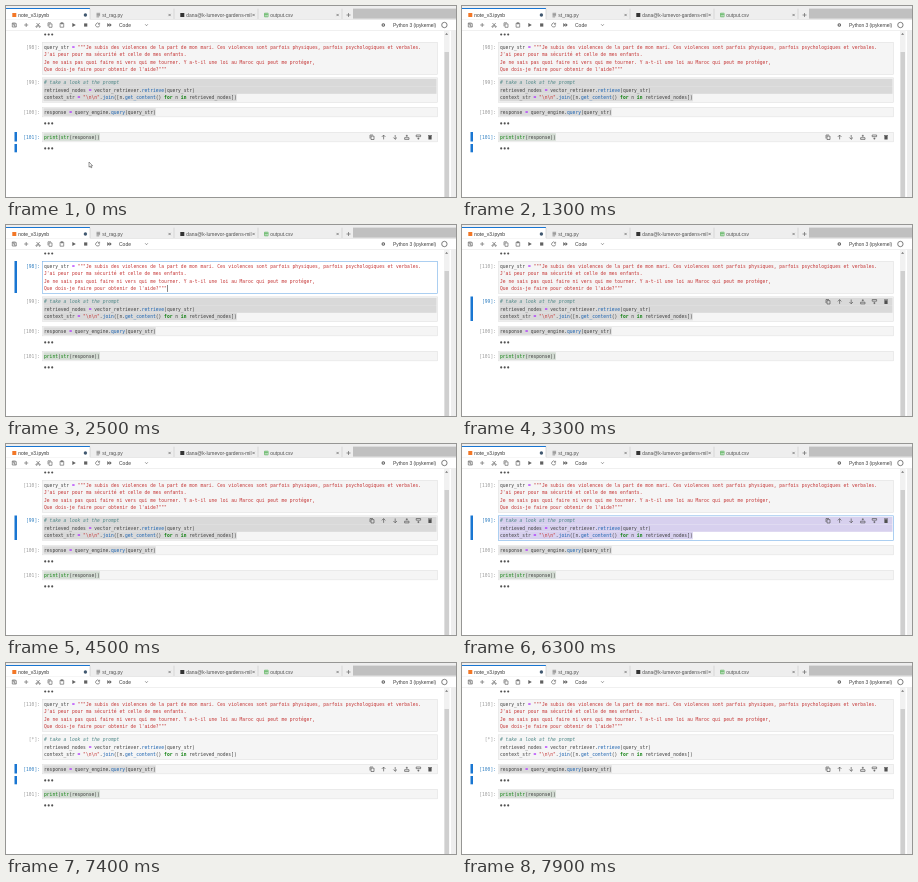
These frames come from a looping animation (450x191 px, 8000 ms). An HTML page with a canvas:

```html
<!DOCTYPE html>
<html lang="fr">
<head>
<meta charset="utf-8">
<title>Notebook</title>
<style>
  html, body { margin: 0; width: 100%; height: 100%; overflow: hidden; background: #fff; }
  canvas { display: block; width: 450px; height: 191px; }
</style>
</head>
<body>
<canvas id="stage"></canvas>
<script>
const W = 450, H = 191, LOOP = 8000;
const canvas = document.getElementById('stage');
const ctx = canvas.getContext('2d');
const dpr = window.devicePixelRatio || 1;
canvas.width = W * dpr;
canvas.height = H * dpr;

const MONO = '"DejaVu Sans Mono", monospace';
const SANS = '"Liberation Sans", Arial, sans-serif';
const CODE_SIZE = 4.64, CHAR = CODE_SIZE * 0.602, LINE = 7.5;
const LEFT = 36.5, RIGHT = 431.5, CODE_X = 38;
const TAB_W = 84, TAB_TOP = 2.6;
const BLUE = '#1976d2', EDIT_BLUE = '#76b0e8', ICON = '#616161';

// Token styles: colour and font prefix
const STYLES = {
  n: ['#404040', ''],
  o: ['#aa22ff', 'bold '],
  s: ['#c43434', ''],
  c: ['#508888', 'italic '],
  k: ['#108010', 'bold '],
  b: ['#108010', ''],
  p: ['#1a62b0', '']
};

const cells = [
  { y: 36.3, lines: [
    [['n', 'query_str '], ['o', '= '], ['s', '"""Je subis des violences de la part de mon mari. Ces violences sont parfois physiques, parfois psychologiques et verbales.']],
    [['s', "J'ai peur pour ma sécurité et celle de mes enfants."]],
    [['s', 'Je ne sais pas quoi faire ni vers qui me tourner. Y a-t-il une loi au Maroc qui peut me protéger,']],
    [['s', 'Que dois-je faire pour obtenir de l\'aide?"""']]
  ] },
  { y: 71.8, lines: [
    [['c', '# take a look at the prompt']],
    [['n', 'retrieved_nodes '], ['o', '= '], ['n', 'vector_retriever.'], ['p', 'retrieve'], ['n', '(query_str)']],
    [['n', 'context_str '], ['o', '= '], ['s', '"\\n\\n"'], ['n', '.'], ['p', 'join'], ['n', '([n.'], ['p', 'get_content'], ['n', '() '], ['k', 'for '], ['n', 'n '], ['k', 'in '], ['n', 'retrieved_nodes])']]
  ] },
  { y: 101.3, output: 113, lines: [
    [['n', 'response '], ['o', '= '], ['n', 'query_engine.'], ['p', 'query'], ['n', '(query_str)']]
  ] },
  { y: 126.3, output: 138, lines: [
    [['b', 'print'], ['n', '('], ['b', 'str'], ['n', '(response))']]
  ] }
];

function rect(x, y, w, h, color) {
  ctx.fillStyle = color;
  ctx.fillRect(x, y, w, h);
}

// Text is laid out large and scaled down so advances stay fractional.
function text(str, x, y, size, color, family = SANS, style = '', align = 'left') {
  ctx.save();
  ctx.translate(x, y);
  ctx.scale(0.1, 0.1);
  ctx.font = `${style}${size * 10}px ${family}`;
  ctx.textAlign = align;
  ctx.fillStyle = color;
  ctx.fillText(str, 0, 0);
  ctx.restore();
}

function icon(path, x, y, color = ICON, fill = false, width = 0.65) {
  const p = new Path2D(path);
  ctx.save();
  ctx.translate(x, y);
  ctx.lineWidth = width;
  ctx.strokeStyle = ctx.fillStyle = color;
  fill ? ctx.fill(p) : ctx.stroke(p);
  ctx.restore();
}

const SHAPES = {
  save: 'M-2-2H1.2L2-1.2V2H-2ZM-1.2-2V-.7H.8V-2M-.7.6H.7V2',
  plus: 'M-2 0H2M0-2V2',
  cut: 'M-1.6-2L1 1.2M1.6-2L-1 1.2M-.8 1.6A.7.7 0 1 1-2.2 1.6A.7.7 0 1 1-.8 1.6M2.2 1.6A.7.7 0 1 1 .8 1.6A.7.7 0 1 1 2.2 1.6',
  copy: 'M-1-1.1H2V2.3H-1ZM-2 1.3V-2.2H1',
  paste: 'M-1.8-1.7H1.8V2.2H-1.8ZM-.8-2.3H.8V-1.1H-.8Z',
  run: 'M-1.5-2.1L2 0L-1.5 2.1Z',
  stop: 'M-1.6-1.6H1.6V1.6H-1.6Z',
  restart: 'M1.5-1.3A2 2 0 1 0 2 .4M2-2.2V-.7H.5',
  forward: 'M-2.2-1.9L0 0L-2.2 1.9ZM0-1.9L2.2 0L0 1.9Z',
  chevron: 'M-1.3-.7L0 .7L1.3-.7',
  close: 'M-1.1-1.1L1.1 1.1M1.1-1.1L-1.1 1.1',
  up: 'M0 2.2V-2M-1.8-.3L0-2.1L1.8-.3',
  down: 'M0-2.2V2M-1.8.3L0 2.1L1.8.3',
  above: 'M-2.2.5H2.2V2.2H-2.2ZM0-.4V-2.4M-1-1.4H1',
  below: 'M-2.2-2.2H2.2V-.5H-2.2ZM0 .4V2.4M-1 1.4H1',
  trash: 'M-1.6-1.1H1.6V2.4H-1.6ZM-2-2.3H2V-1.5H-2Z',
  lines: 'M-1.8-1.7H1.8M-1.8-.5H1.8M-1.8.7H1.8M-1.8 1.9H.8',
  grid: 'M-1.8-1.8H1.8V1.8H-1.8ZM-1.8-.4H1.8M-.3-1.8V1.8',
  block: 'M-2-2H2V2H-2Z',
  arrow: 'M-1.5.8L0-1L1.5.8Z',
  pointer: 'M0 0V5.2L1.2 4.1L2 5.9L2.8 5.5L2 3.8H3.6Z'
};

function circle(x, y, r, color, fill) {
  ctx.beginPath();
  ctx.arc(x, y, r, 0, Math.PI * 2);
  ctx.lineWidth = 0.8;
  ctx.fillStyle = ctx.strokeStyle = color;
  fill ? ctx.fill() : ctx.stroke();
}

function drawTabs() {
  rect(0, 0, W, 13, '#eeeeee');
  rect(4 * TAB_W + 11, TAB_TOP, W, 10, '#c0c0c0');
  rect(0, 13, W, 0.5, '#d0d0d0');
  const tabs = [
    ['note_v3.ipynb', 'block', '#f37726'],
    ['st_rag.py', 'lines', '#707070'],
    ['dana@k-lumevor-gardens-mil', 'block', '#333333'],
    ['output.csv', 'grid', '#4caf50']
  ];
  tabs.forEach(([label, shape, color], i) => {
    const active = i === 0, x = i * TAB_W, end = x + TAB_W;
    if (active) {
      rect(x, TAB_TOP, TAB_W, 11, '#ffffff');
      rect(x, TAB_TOP - 0.6, TAB_W, 1, BLUE);
    }
    rect(end - 0.3, TAB_TOP, 0.6, 10.4, '#c8c8c8');
    icon(SHAPES[shape], x + 8.3, 9, color, shape === 'block');
    text(label, x + 12.3, 10.9, 4.95, active ? '#333333' : '#505050');
    if (active) circle(end - 4.6, 9, 1.7, '#405870', true);
    else icon(SHAPES.close, end - 4.4, 9);
  });
  icon(SHAPES.plus, 4 * TAB_W + 6.5, 9);
}

function drawToolbar() {
  const names = ['save', 'plus', 'cut', 'copy', 'paste', 'run', 'stop', 'restart', 'forward'];
  const solid = ['run', 'stop', 'forward'];
  names.forEach((name, i) => icon(SHAPES[name], 8.3 + i * 11.9, 19, ICON, solid.includes(name)));
  text('Code', 113, 20.8, 5, '#404040');
  icon(SHAPES.chevron, 140.5, 19);
  circle(377.3, 19, 1.8, ICON, true);
  circle(377.3, 19, 0.7, '#ffffff', true);
  text('Python 3 (ipykernel)', 387, 20.8, 4.85, '#404040');
  circle(438.4, 19, 2.7, ICON);
  rect(0, 24, W, 0.5, '#e0e0e0');
}

function drawScrollbar() {
  rect(438, 24.5, 5.5, H, '#f1f1f1');
  icon(SHAPES.arrow, 440.6, 28, '#707070', true);
  rect(438.5, 46, 4.5, H, '#cfcfcf');
  rect(445, 24.5, 5, H, '#eeeeee');
}

function drawDots(y) {
  for (let i = 0; i < 3; i++) circle(39.2 + i * 3.5, y, 1.05, '#505050', true);
}

function lineLength(line) {
  return line.reduce((n, [, str]) => n + str.length, 0);
}

function drawSelection(cell, color) {
  cell.lines.forEach((line, i) => {
    const last = i === cell.lines.length - 1;
    const end = last ? CODE_X + lineLength(line) * CHAR : RIGHT - 1;
    rect(CODE_X - 0.5, cell.y + 1 + i * LINE, end - CODE_X + 0.5, LINE, color);
  });
}

function drawCell(cell, prompt, active, edit, selection) {
  const h = cell.lines.length * LINE + 2;
  rect(LEFT, cell.y, RIGHT - LEFT, h, edit ? '#ffffff' : '#f5f5f5');
  if (selection) drawSelection(cell, selection);
  ctx.lineWidth = 0.6;
  ctx.strokeStyle = edit ? EDIT_BLUE : '#e2e2e2';
  ctx.strokeRect(LEFT, cell.y, RIGHT - LEFT, h);

  const base = cell.y + 6.5;
  text(`[${prompt}]:`, 34, base, CODE_SIZE, active ? '#307fc1' : '#9a9a9a', MONO, '', 'right');
  cell.lines.forEach((line, i) => {
    let x = CODE_X;
    for (const [kind, str] of line) {
      const [color, style] = STYLES[kind];
      text(str, x, base + i * LINE, CODE_SIZE, color, MONO, style);
      x += str.length * CHAR;
    }
  });

  if (cell.output) drawDots(cell.output + 4.4);
  if (active) {
    rect(8.5, cell.y - 0.3, 2.5, h, BLUE);
    if (cell.output) rect(8.5, cell.output, 2.5, 8.3, BLUE);
  }
}

function drawCellTools(cell) {
  ['copy', 'up', 'down', 'above', 'below', 'trash'].forEach((name, i) =>
    icon(SHAPES[name], 366 + i * 11.6, cell.y + 4.9, '#505050', name === 'trash'));
}

function drawCaret(cell, line, col, since, t) {
  if (Math.floor((t - since) / 500) % 2 === 0) {
    rect(CODE_X + col * CHAR + 0.2, cell.y + 1.2 + line * LINE, 0.6, LINE - 0.6, '#333333');
  }
}

function draw(t) {
  ctx.setTransform(dpr, 0, 0, dpr, 0, 0);
  rect(0, 0, W, H, '#ffffff');
  drawTabs();
  drawToolbar();
  drawScrollbar();
  drawDots(28.5);

  const active = t < 1400 ? 3 : t < 3000 ? 0 : t < 7400 ? 1 : 2;
  const editing = (t >= 1400 && t < 3000) || (t >= 6300 && t < 7400);
  const prompts = [t < 3000 ? '98' : t < 3100 ? '*' : '110', t < 7400 ? '99' : '*', '100', '101'];
  const selections = [null, t < 6300 ? '#d9d9d9' : t < 6400 ? '#d7d0ee' : null, '#dadada', '#d4ddd4'];

  cells.forEach((cell, i) =>
    drawCell(cell, prompts[i], i === active, editing && i === active, selections[i]));
  if (active !== 0) drawCellTools(cells[active]);

  if (active === 0) drawCaret(cells[0], 3, 44, 1400, t);
  if (active === 1 && t >= 6400) drawCaret(cells[1], 1, 49, 6400, t);
  if (t < 1300) {
    icon(SHAPES.pointer, 83, 156, '#ffffff', true);
    icon(SHAPES.pointer, 83, 156, '#333333', false, 0.5);
  }
}

const start = performance.now();
function frame() {
  draw((performance.now() - start) % LOOP);
  requestAnimationFrame(frame);
}
frame();
</script>
</body>
</html>
```
